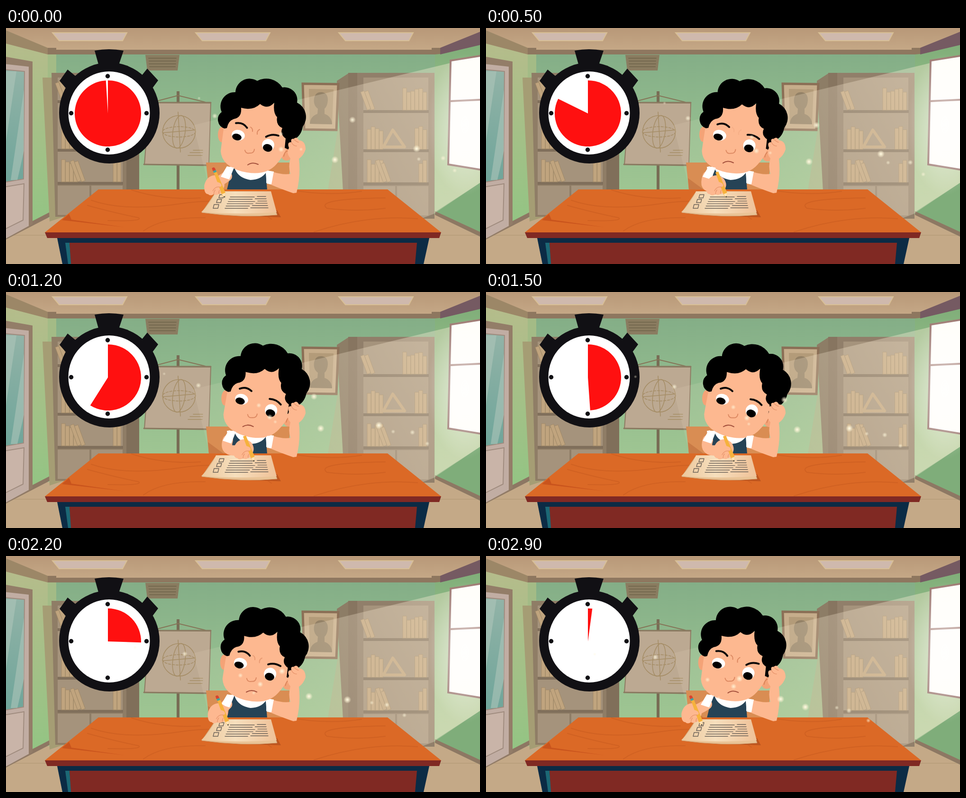
An HTML page that plays this animation: 1000 px wide and 500 px high, repeating every 3 s.

```html
<!DOCTYPE html>
<html lang="en">
<head>
<meta charset="utf-8">
<title>Exam clock</title>
<style>
html, body { margin: 0; width: 100%; height: 100%; overflow: hidden; background: #c4a987 }
svg { display: block; width: 100vw; height: 100vh }
.line { fill: none; stroke-linecap: round; stroke-linejoin: round }
</style>
</head>
<body>
<svg viewBox="0 0 1000 500">
<defs>
  <linearGradient id="ceil" x2="0" y2="1"><stop stop-color="#b89878"/><stop offset="1" stop-color="#c6a987"/></linearGradient>
  <linearGradient id="wall" x2="0" y2="1"><stop stop-color="#84ae87"/><stop offset=".5" stop-color="#95be8f"/><stop offset="1" stop-color="#a4c994"/></linearGradient>
  <linearGradient id="side" x2="0" y2="1"><stop stop-color="#b5bc8b"/><stop offset="1" stop-color="#90c583"/></linearGradient>
  <linearGradient id="right" x2="0" y2="1"><stop stop-color="#80ae79"/><stop offset=".6" stop-color="#a9cb99"/><stop offset="1" stop-color="#b9cfa3"/></linearGradient>
  <linearGradient id="glass" x2="0" y2="1"><stop stop-color="#92b3a7"/><stop offset="1" stop-color="#6fa59a"/></linearGradient>
  <linearGradient id="beam" x1="1" x2="0" y2=".3"><stop stop-color="#fff0d8" stop-opacity=".42"/><stop offset="1" stop-color="#fff0d8" stop-opacity=".1"/></linearGradient>
  <linearGradient id="paper"><stop stop-color="#ecc79c"/><stop offset=".45" stop-color="#f6dfbd"/><stop offset="1" stop-color="#efc198"/></linearGradient>
  <radialGradient id="glow"><stop stop-color="#fff" stop-opacity=".95"/><stop offset="1" stop-color="#fff" stop-opacity="0"/></radialGradient>
  <radialGradient id="dust"><stop stop-color="#fffbe8"/><stop offset=".35" stop-color="#fff6d8" stop-opacity=".75"/><stop offset="1" stop-color="#fff6d8" stop-opacity="0"/></radialGradient>
</defs>

<!-- room -->
<path fill="url(#ceil)" d="M0 0H1000V50H0Z"/>
<path fill="url(#wall)" d="M88 56H916V405H88Z"/>
<path fill="#c4a987" d="M0 448L105 395H905L1000 440V500H0Z"/>
<path stroke="#b09573" d="M0 439H1000"/>
<path fill="url(#side)" d="M0 30L88 55 104 70V390L0 448Z"/>
<path fill="#a3bb86" d="M88 56H106V110H88Z"/>
<path fill="#8e775f" d="M88 42H106V46H898V42H916V56H88Z"/>
<path fill="#9c8767" d="M0 5L88 42V56L0 33Z"/>
<path fill="#8d7763" d="M0 448V438L104 384V394Z"/>
<path fill="url(#right)" d="M916 55L1000 35V442L905 395V56Z"/>
<path fill="#755a62" d="M1000 8V36L916 56V42Z"/>
<path fill="#7fad7a" d="M905 390L1000 328V434Z"/>
<path fill="#8d7863" d="M905 388L1000 432V442L905 396Z"/>
<g id="lights" fill="#cfb9ad" stroke="#d8bf95" stroke-width="2"></g>
<path fill="#8a7c60" d="M294 57H366L362 90H298Z"/>
<path class="line" stroke="#75694f" stroke-width="2" d="M301 64H359M302 70H358M302 76H358M303 82H357"/>

<!-- door -->
<path fill="#937d68" d="M0 61L56 71V416L0 442Z"/>
<path fill="#c1ada3" stroke="#937d68" stroke-width="2" d="M-4 75L49 81V420L-4 449Z"/>
<path fill="url(#glass)" stroke="#a08c7f" stroke-width="2" d="M-4 88L39 92 37 320-4 327Z"/>
<path fill="#adc5ba" opacity=".6" d="M0 92L22 92 0 240ZM38 130V260L24 322H10Z"/>
<path fill="#c9b4a8" stroke="#a08c7f" stroke-width="2" d="M-4 337L38 330 36 407-4 427Z"/>

<!-- bookcases -->
<path fill="#a59d74" d="M77 105H98L122 400 92 410Z"/>
<path fill="#8f7d66" d="M96 95H281V400H104Z"/>
<path fill="#806f5a" d="M254 95H281V343H254Z"/>
<path fill="#b4ad85" opacity=".5" d="M700 215L722 200V343H679Z"/>
<path fill="#8d7d66" d="M698 112L724 95V400H714Z"/>
<path fill="#917f6a" d="M722 95H904V404H722Z"/>
<path fill="#877560" d="M722 95H741V404H722Z"/>
<g id="shelves"></g>
<path class="line" stroke="#c0a47e" stroke-width="6" d="M796 252L816 216 841 252Z"/>

<!-- wall items -->
<path fill="#786d55" d="M360 134H366V343H360Z"/>
<path class="line" stroke="#857558" stroke-width="2" d="M310 157L363 143 420 157"/>
<path fill="#bca992" stroke="#8d7b63" stroke-width="2" d="M302 158L432 159 428 290 292 289Z"/>
<path class="line" stroke="#8a7a61" stroke-width="3" d="M302 158H432M291 289L429 291"/>
<g class="line" stroke="#a58d66" stroke-width="1.5">
  <circle cx="365" cy="220" r="34.5"/>
  <ellipse cx="365" cy="220" rx="13" ry="35" transform="rotate(8 365 220)"/>
  <ellipse cx="365" cy="220" rx="35" ry="11" stroke-dasharray="5 3"/>
  <path d="M363 178L368 263M331 222L400 216M395 259H415M388 264H415M384 270H414"/>
</g>
<path fill="#c6ad8b" stroke="#8b6f56" stroke-width="5" d="M626 118L701 119 697 216 629 215Z"/>
<path fill="#b39b79" d="M639 129L691 130 688 204 641 203Z"/>
<path fill="#938166" d="M641 203Q642 187 657 182L658 171Q648 164 650 149Q653 135 666 136Q679 137 679 153Q678 166 672 171L672 182Q687 187 688 204Z"/>

<!-- window -->
<path fill="url(#beam)" d="M938 74L395 206 430 343 860 410 902 394 1000 328V62Z"/>
<path fill="#fffefa" stroke="#a07d76" stroke-width="4" d="M938 69L1006 58V301L933 289Z"/>
<path stroke="#ad8a82" stroke-width="4" d="M937 155L1000 152"/>
<ellipse cx="968" cy="205" rx="80" ry="150" fill="url(#glow)" opacity=".6"/>

<!-- stopwatch -->
<g fill="#111014">
  <path d="M187 48Q217 42 248 48L236 84H197Z"/>
  <path d="M113 112L130 88 154 108 132 134ZM298 86L321 111 304 134 282 106Z"/>
  <ellipse cx="218" cy="180" rx="106" ry="107"/>
</g>
<ellipse cx="217.5" cy="180" rx="86" ry="88" fill="#fff"/>
<path stroke="#111014" stroke-width="9.5" stroke-linecap="round" d="M214.5 102h.01M214.5 258h.01M137.5 180.5h.01M296.5 180.5h.01"/>
<path id="pie" fill="#ff1010"/>

<!-- pupil -->
<path fill="#d98d53" d="M422 285H600L595 343H428Z"/>
<path fill="#c97a45" d="M426 318L460 343H428Z"/>
<path fill="#fff" d="M466 294L486 294 552 302 564 304 561 332 548 329 470 325Z"/>
<path fill="#264356" d="M482 296Q489 318 516 322Q538 321 548 307L551 343H466Q472 320 475 299Z"/>
<g id="head">
  <ellipse cx="455" cy="226" rx="8" ry="16" fill="#f4a377"/>
  <ellipse cx="592" cy="266" rx="13" ry="15" fill="#f4a377"/>
  <path class="line" stroke="#d47f55" stroke-width="1.5" d="M586 272Q588 259 598 260"/>
  <path fill="#fdb890" d="M464 180Q456 235 453 261Q455 292 498 304Q547 316 571 288Q592 265 599 230L580 160H490Z"/>
  <g fill="#fff">
    <ellipse cx="490" cy="227" rx="14" ry="11" transform="rotate(15 490 227)"/>
    <ellipse cx="553" cy="248" rx="13" ry="13"/>
  </g>
  <ellipse cx="487" cy="231" rx="10" ry="7" transform="rotate(14 487 231)"/>
  <ellipse cx="552" cy="254" rx="10" ry="8" transform="rotate(14 552 254)"/>
  <path class="line" stroke="#dd8a63" stroke-width="2" d="M504 259Q506 267 514 265Q523 266 524 257"/>
  <path id="frown" class="line" stroke="#dd8a63" stroke-width="2" d="M516 210Q521 213 520 219M535 215Q529 218 530 225"/>
  <g class="line" stroke="#0a0808" stroke-width="4">
    <path id="browL" d="M485 205Q499 199 510 209"/>
    <path id="browR" d="M549 224Q563 224 573 235"/>
  </g>
  <path id="mouth" class="line" stroke="#a4513d" stroke-width="2" d="M495 285Q505 278 517 284"/>
  <path d="M461 213A20 20 0 0 1 455 178A30 30 0 0 1 484 136A30 30 0 0 1 530 112A40 40 0 0 1 583 126A27 27 0 0 1 614 158A34 34 0 0 1 626 209Q623 228 608 236Q606 252 597 258L588 254 590 234Q577 225 583 212Q569 206 572 189Q563 180 566 158Q552 174 536 161Q521 176 496 169Q498 190 480 193Q469 197 466 212Z"/>
</g>

<!-- desk -->
<path fill="#db6926" d="M195 342H805L918 433H82Z"/>
<path class="line" stroke="#d06122" stroke-width="2" d="M180 365Q250 390 370 372T560 405M172 376Q230 392 280 402Q290 410 215 408M290 430Q330 400 420 402M265 343Q330 365 410 360M800 360Q650 362 677 382Q740 390 800 382M600 343Q680 357 750 346M650 432Q760 395 868 404"/>
<path fill="#c9541d" d="M133 394L138 406 250 422 118 407Z"/>
<path fill="#802923" d="M82 433H918L914 445H87Z"/>
<path fill="#0b2b45" d="M108 445H893L881 500H119Z"/>
<path fill="#1c6875" d="M125 455H134L138 500H131Z"/>
<path fill="#802923" d="M134 455H867L863 500H137Z"/>
<path fill="#bd551f" d="M412 390L572 386 580 401 480 398Z"/>
<path fill="#e9c396" stroke="#d0a072" d="M441 350H555L572 396Q500 403 413 391Z"/>
<path fill="url(#paper)" d="M443 346H559L571 390Q500 396 412 390Q433 371 443 346Z"/>
<g class="line" stroke="#6b6158" stroke-width="1.4">
  <path d="M451 353h9l-2 7h-9ZM446 363h9l-2 7h-9ZM439 374h10l-2 8h-10Z"/>
  <path id="rules"/>
</g>

<!-- arms -->
<path fill="#fdb890" d="M561 304Q584 312 600 309Q595 294 600 276Q590 265 597 254Q592 241 602 242Q600 233 607 235Q613 229 618 238Q632 239 632 257Q628 270 618 277Q622 312 613 349L606 350Q580 341 559 332Z"/>
<path class="line" stroke="#e7956c" stroke-width="1.3" d="M602 242Q606 250 613 250M607 235Q612 241 617 242"/>
<path fill="#fff" d="M550 305L565 304 560 331 549 328Z"/>
<path id="arm" class="line" stroke="#fdb890" stroke-width="22"/>
<path id="sleeve" fill="#fff" d="M453 315L466 293 481 296 471 321Z"/>
<g id="hand">
  <path fill="#fdb890" d="M-43-27Q-38-47-21-48Q-6-46-2-35Q2-25-4-18Q-2-8-12-9Q-17-4-23-8Q-30-3-35-8Q-44-8-43-27Z"/>
  <path fill="#f6b23d" d="M-23-54L-17-56 2-10 0 0-6-7Z"/>
  <path fill="#fde3b8" d="M-6-8L2-11 0 0Z"/>
  <path fill="#333" d="M-2-3L1-4 0 0Z"/>
  <g id="eraser"><path fill="#42a3a0" d="M-25-58L-19-60-17-55-23-53Z"/><path fill="#d9432f" d="M-27-63Q-22-67-20-62L-19-59-25-57Z"/></g>
  <path fill="#fdb890" d="M-32-28Q-20-38-9-31Q-4-26-10-23Q-20-25-25-15Q-31-14-32-28Z"/>
  <path class="line" stroke="#e7956c" stroke-width="1.3" d="M-10-23Q-20-25-25-15M-23-8Q-23-13-20-17M-12-9Q-13-13-11-16"/>
</g>
<g id="motes"></g>
</svg>

<script>
const LOOP = 3000, STEP = 100;
const $ = id => document.getElementById(id);
const set = (id, name, value) => $(id).setAttribute(name, value);
const clamp = (v, low = 0) => Math.max(low, Math.min(1, v));
const fill = (id, n, part) => $(id).innerHTML = Array.from({ length: n }, (_, i) => part(i)).join('');
// cosine over the loop, highest at the given time
const wave = (t, peak) => Math.cos((t - peak) / LOOP * 2 * Math.PI);

let seed = 11;
const random = (low, high) => {
  seed = seed * 16807 % 2147483647;
  return low + (high - low) * seed / 2147483647;
};

fill('lights', 3, i => `<path d="M${98 + 302 * i} 10h157l-9 17h-134Z"/>`);

// count books side by side, the last few leaning back
function books(x, floor, count, leaning) {
  let out = '';
  for (let i = 0; i < count; i++) {
    const left = x + i * 8.5, h = random(38, 49), turn = i < count - leaning ? 0 : -20;
    out += `<rect x="${left}" y="${floor - h}" width="8" height="${h}" transform="rotate(${turn} ${left} ${floor})"/>`;
  }
  return out;
}

function bookcase(x, top, floors) {
  const bottom = floors[2];
  let out = `<path fill="#a5937c" d="M${x} ${top}h137V${bottom}h-137ZM${x} ${bottom + 8}h67v62h-67ZM${x + 71} ${bottom + 8}h66v62h-66Z"/>`;
  floors.forEach((floor, i) => {
    const right = Math.max(2, 6 - 3 * i);
    out += `<path fill="#806f5b" d="M${x} ${floor}h138v6h-138Z"/><g fill="#c0a47e" stroke="#a18a69">`
      + books(x + 8, floor, 2 + 2 * i, i == 1 ? 0 : 2)
      + books(x + 134 - right * 8.5, floor, right, 0) + '</g>';
  });
  return out;
}
$('shelves').innerHTML = bookcase(109, 105, [153, 256, 326]) + bookcase(754, 105, [174, 257, 327]);

// written lines: a short start and a longer rest, widening down the page
let rules = '';
for (let i = 0; i < 6; i++) {
  const gap = random(505, 525), y = 358 + i * 4.8;
  rules += `M${473 - i * 2.2} ${y}H${gap}M${gap + 6} ${y - 1}H${548 + i}`;
}
set('rules', 'd', rules);

// dust drifts left and slightly down; bigger specks are brighter
const motes = Array.from({ length: 11 }, () => {
  const x = random(380, 950);
  return { x, y: random(180, 280) + (x - 650) * .15, speed: random(.02, .07), r: random(3, 8) };
});
fill('motes', motes.length, i => `<circle r="${motes[i].r}" opacity="${motes[i].r / 8}" fill="url(#dust)"/>`);

function draw(t) {
  const angle = (3.5 + t * .1203) * Math.PI / 180;
  const x = 215 - 70 * Math.sin(angle), y = 181 - 70 * Math.cos(angle);
  set('pie', 'd', `M215 181V111A70 70 0 ${+(angle < Math.PI)} 1 ${x} ${y}Z`);

  const lean = 1 - Math.abs(t / LOOP * 2 - 1);
  set('head', 'transform', `translate(${3.5 * lean} ${1.5 * lean}) rotate(${3 * lean} 520 330)`);

  const cross = clamp(.2 - wave(t, 1250));
  set('browL', 'transform', `rotate(${14 * cross} 499 204)`);
  set('browR', 'transform', `rotate(${-30 * cross} 561 228)`);
  set('mouth', 'transform', `translate(${15 * cross} ${5 * cross})`);
  set('frown', 'opacity', cross);

  const tip = 486 + 37 * clamp(.3 + 1.3 * wave(t, 1150), -1);
  const reach = clamp((tip - 461) / 49);
  set('hand', 'transform', `translate(${tip} 360)`);
  set('eraser', 'opacity', +(tip < 503));
  set('arm', 'd', `M${466 + reach * 2} 314Q${455 + reach * 4} ${322 + reach * 20} ${tip - 28} 334`);
  set('sleeve', 'transform', `translate(${reach * 4} 0)`);

  motes.forEach((m, i) => {
    const dot = $('motes').children[i], way = m.speed * t;
    dot.setAttribute('cx', m.x - way);
    dot.setAttribute('cy', m.y + way / 3);
  });
}

function tick() {
  draw(Math.floor(performance.now() % LOOP / STEP) * STEP);
  requestAnimationFrame(tick);
}
tick();
</script>
</body>
</html>
```
